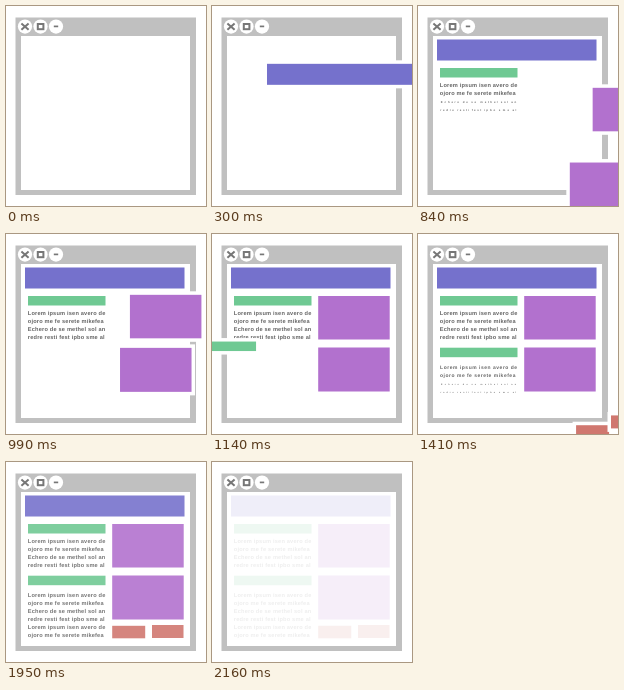
These frames come from a looping animation (200 by 200 pixels, 2.43 s). An HTML page:

```html
<!DOCTYPE html>
<html lang="en">
<head>
<meta charset="utf-8">
<title>Page layout assembling</title>
<style>
  html, body { margin: 0; width: 100%; height: 100%; overflow: hidden; background: #fff; }
  svg { display: block; width: 100vw; height: 100vh; }
  text { font-family: "Liberation Sans", Arial, sans-serif; font-weight: bold; fill: #666; text-rendering: geometricPrecision; }
</style>
</head>
<body>
<svg viewBox="0 0 200 200">
  <rect width="200" height="200" fill="#fff"/>
  <rect x="9.5" y="11.5" width="180.5" height="177.5" fill="#c0c0c0"/>
  <rect x="15" y="30" width="169" height="154" fill="#fff"/>
  <g fill="#fff">
    <circle cx="19" cy="20.6" r="7.1"/>
    <circle cx="34.5" cy="20.6" r="7.1"/>
    <circle cx="50" cy="20.6" r="7.1"/>
  </g>
  <g fill="none" stroke="#777" stroke-width="2">
    <path d="M15.4 17.4L22.6 23.8M22.6 17.4L15.4 23.8"/>
    <rect x="31.8" y="18" width="5.6" height="5.2"/>
    <path d="M47.8 20.4H52.2" stroke-width="1.7"/>
  </g>
  <g id="page"></g>
</svg>
<script>
const LOOP = 2430, STEP = 30;
const FONT = 5.65, TRACK = 0.18, LEFT = 21.8, LEADING = 8;
const LINES = [
  "Lorem ipsum isen avero de",
  "ojoro me fe serete mikefea",
  "Echero de se methel sol an",
  "redre resti fest ipbo sme al"
];
const page = document.getElementById("page");
const pen = document.createElement("canvas").getContext("2d");
pen.font = 'bold 100px "Liberation Sans", Arial, sans-serif';
const parts = [];

const clamp = v => Math.max(0, Math.min(1, v));

function add(tag, attrs) {
  const el = document.createElementNS("http://www.w3.org/2000/svg", tag);
  for (const k in attrs) el.setAttribute(k, attrs[k]);
  return page.appendChild(el);
}

function bezier(a, b, c, d, p) {
  const q = 1 - p;
  return q * q * q * a + 3 * q * q * p * b + 3 * q * p * p * c + p * p * p * d;
}

// A block with a white rim that flies along a cubic path to its place.
function block(color, w, h, start, length, path) {
  const el = add("rect", {
    width: w, height: h, fill: color,
    stroke: "#fff", "stroke-width": 7, "paint-order": "stroke"
  });
  const [a, b, c, d] = path;
  parts.push(t => {
    const p = clamp((t - start) / length);
    el.setAttribute("x", bezier(a[0], b[0], c[0], d[0], p));
    el.setAttribute("y", bezier(a[1], b[1], c[1], d[1], p));
    el.style.display = t < start ? "none" : "";
  });
}

function greenBar(y, start) {
  block("#6fc993", 77.5, 9.5, start, 270,
    [[-81.5, y + 40], [-24, y - 43], [2.5, y + 5], [22, y]]);
}

// Every letter grows in its own place, standing on the baseline.
function line(str, y, start) {
  const el = add("text", { y });
  el.textContent = str;
  const glyphs = [];
  let x = LEFT;
  for (const ch of str) {
    const w = pen.measureText(ch).width * FONT / 100;
    glyphs.push({ x, w });
    x += w + TRACK;
  }
  parts.push(t => {
    const s = clamp((t - start) / 240);
    el.style.display = s ? "" : "none";
    el.setAttribute("font-size", FONT * s);
    el.setAttribute("x", glyphs.map(g => (g.x + g.w * (1 - s) / 2).toFixed(3)).join(" "));
  });
}

function paragraph(count, y, start) {
  for (let i = 0; i < count; i++) {
    line(LINES[i % LINES.length], y + i * LEADING, start + 120 * Math.floor(i / 2));
  }
}

block("#7571cc", 159.5, 21, 0, 360, [[204, -60], [150, 200], [94, 71.5], [19, 33.5]]);
greenBar(62, 450);
paragraph(4, 81.2, 600);
block("#b271ce", 71.5, 43.5, 780, 330, [[206, 100], [142, 60.6], [115, 56], [106.2, 62]]);
block("#b271ce", 71.5, 44, 780, 330, [[180, 203], [120, 97], [108, 114], [106.2, 113.5]]);
greenBar(113.7, 1050);
paragraph(6, 135.2, 1200);
block("#d0776f", 33, 12.5, 1380, 300, [[172, 204], [122, 156], [109, 164], [106.2, 163.8]]);
block("#d0776f", 31.5, 13, 1380, 300, [[204, 190], [165, 158], [150, 161], [146, 163]]);

function draw(t) {
  t = Math.floor(t / STEP) * STEP;
  for (const part of parts) part(t);
  page.setAttribute("opacity", 1 - clamp((Math.min(t, 2160) - 1920) / 270));
}

const origin = performance.now();
function tick() {
  draw((performance.now() - origin) % LOOP);
  requestAnimationFrame(tick);
}
draw(0);
requestAnimationFrame(tick);
</script>
</body>
</html>
```
